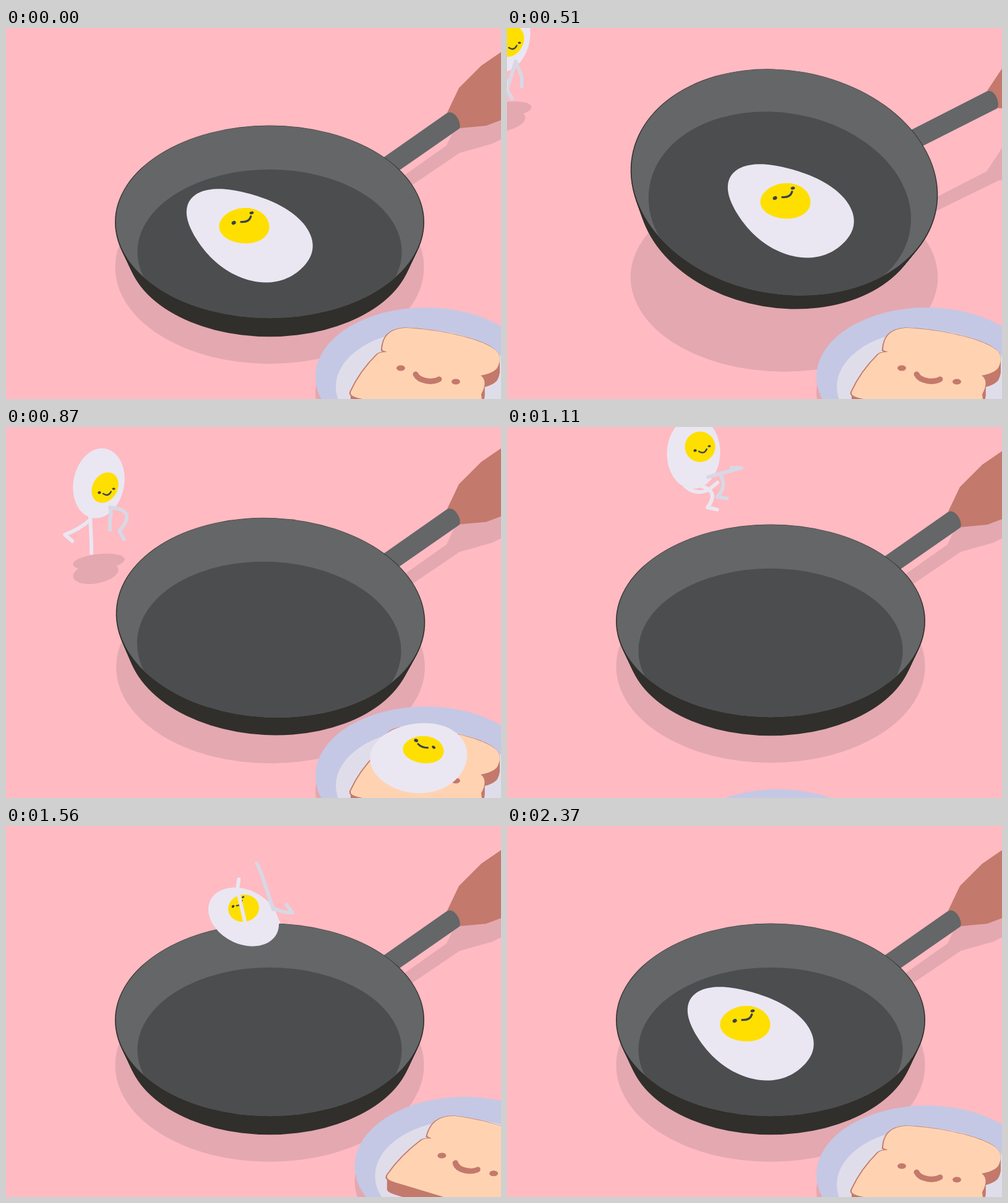
Recreate the animation shown at these times as an HTML page with a canvas. Size 800 by 600 pixels, loop 2.4 s.

```html
<!DOCTYPE html>
<html lang="en">
<head>
<meta charset="utf-8">
<title>Breakfast</title>
<style>
html, body { margin: 0; width: 100%; height: 100%; overflow: hidden; background: #ffbac2; }
canvas { display: block; width: 800px; height: 600px; }
</style>
</head>
<body>
<canvas id="stage" width="800" height="600"></canvas>
<script>
const ctx = document.getElementById('stage').getContext('2d');
const LOOP = 2400, STEP = 30;
const C = {
  bg: '#ffbac2', shade: '#e4a8b0', wall: '#646667', floor: '#4c4d4e', iron: '#302f2b',
  hand: '#c3796b', plate: '#c4c8e4', dish: '#e0ddea', bread: '#ffd3b2',
  white: '#eae7f2', far: '#d8d8e4', yolk: '#ffdf00', ink: '#3a4050'
};

// ---------- helpers ----------
const { PI, sin, cos, sqrt, pow } = Math;
const part = (t, a, b) => Math.max(0, Math.min(1, (t - a) / (b - a)));
const easeOut = (s, p = 2) => 1 - pow(1 - s, p);
const smooth = s => s * s * (3 - 2 * s);
const rad = deg => deg * PI / 180;

// blends numbers, lists and objects alike
function mix(a, b, u) {
  if (typeof a === 'number') return a + (b - a) * u;
  if (Array.isArray(a)) return a.map((v, i) => mix(v, b[i], u));
  return Object.fromEntries(Object.keys(a).map(k => [k, mix(a[k], b[k], u)]));
}

function at(x, y, draw, deg = 0) {
  ctx.save();
  ctx.translate(x, y);
  ctx.rotate(rad(deg));
  draw();
  ctx.restore();
}

function fill(path, color) {
  ctx.fillStyle = color;
  ctx.fill(path);
}

function stroke(path, width, color) {
  ctx.lineWidth = width;
  ctx.lineCap = ctx.lineJoin = 'round';
  ctx.strokeStyle = color;
  ctx.stroke(path);
}

function ellipse(x, y, rx, ry, color, deg = 0) {
  const path = new Path2D();
  path.ellipse(x, y, rx, ry, rad(deg), 0, 2 * PI);
  fill(path, color);
}

// an ellipse with three soft bulges
function oval([x, y, rx, ry, deg, bulge], color) {
  const path = new Path2D();
  for (let a = 0; a < 2 * PI; a += PI / 60) {
    const r = 1 + bulge * cos(3 * a - 0.75 * PI);
    path.lineTo(rx * r * cos(a), ry * r * sin(a));
  }
  at(x, y, () => fill(path, color), deg);
}

// a bent line that ends in a straight tip
function curve(ax, ay, bx, by, cx, cy, tipX = cx, tipY = cy) {
  const path = new Path2D();
  path.moveTo(ax, ay);
  path.quadraticCurveTo(bx, by, cx, cy);
  path.lineTo(tipX, tipY);
  return path;
}

// ---------- pan ----------
// centre, height of the rim's half axis and tilt; handle: x, y, turn
const RIM = 249.5;
const REST = { x: 426, y: 314, ry: 156, tilt: 0, handle: [0, 0, 0] };
const TOSS = { x: 448, y: 250, ry: 181, tilt: 9.75, handle: [63, -35, 8] };
const BACK = { x: 427.5, y: 309, ry: 161.5, tilt: 2.8, handle: [0, -4.5, 0] };
const HANDLE = new Path2D('M585 227L712 138Q720 133 728 143Q736 154 733 162.500L610 248Z');
const HAND = new Path2D('M713 137L732 97L768 61L800 39L900 -20V140L800 149L776 158L733 162Z');
const ARM_SHADE = new Path2D('M712 190L731 150L768 115L900 40V130L800 180L786 187L733 202L640 265L620 255Z');

function panAt(t) {
  if (t < 510) return mix(REST, TOSS, smooth(part(t, 345, 510)));
  if (t < 870) return mix(TOSS, BACK, easeOut(part(t, 510, 870)));
  return mix(BACK, REST, easeOut(part(t, 870, 990)));
}

function turned(px, py, dx, dy, deg, draw) {
  at(px + dx, py + dy, () => {
    ctx.translate(-px, -py);
    draw();
  }, deg);
}

function drawPan({ x, y, ry, tilt, handle: [hx, hy, turn] }) {
  const lift = REST.y - y;
  ellipse(x, 387 + lift / 4, RIM - lift / 50, REST.ry - lift / 20, C.shade);
  turned(712, 190, hx, turn * 5.25, turn, () => fill(ARM_SHADE, C.shade));
  turned(714, 137, hx, hy, turn, () => {
    fill(HAND, C.hand);
    fill(HANDLE, C.wall);
  });
  const depth = sqrt(1 - (ry / RIM) ** 2);
  at(x, y, () => {
    for (let u = 0; u <= 1.001; u += 0.05)
      ellipse(0, 55 * depth * u, (RIM + 0.5) * (1 - 0.078 * u), (ry + 0.4) * (1 - 0.09 * u), C.iron);
    const rim = new Path2D();
    rim.ellipse(0, -0.4, RIM - 1, ry - 0.4, 0, 0, 2 * PI);
    fill(rim, C.wall);
    ctx.clip(rim);
    ellipse(0, 61.5 * depth, RIM * 0.856, ry * 0.854, C.floor);
  }, tilt);
}

// ---------- toast on its plate ----------
const TOAST = new Path2D('M608 521C609 500 618 487 645 485C700 487 770 503 790 520' +
  'C800 527 800 540 793 551C787 557 778 560 767 562C776 568 775 580 768 592L772 628' +
  'Q770 640 755 637L572 599Q553 595 558 587Q572 556 600 528Q604 524 616 524Z');
const MOUTH = new Path2D('M662 560C668 572 690 574 700 568');

// turn within the plane of the table
function spin(deg, draw) {
  ctx.save();
  ctx.translate(678, 563);
  ctx.scale(1, 0.62);
  ctx.rotate(rad(deg));
  ctx.scale(1, 1 / 0.62);
  ctx.translate(-678, -563);
  draw();
  ctx.restore();
}

function drawPlate(dx, dy, egg) {
  const deg = dx * 0.116;
  at(dx, dy, () => {
    ellipse(678, 589, 178, 112, C.shade);
    ellipse(678, 564, 178, 112, C.plate);
    ellipse(678, 580, 145, 91, C.dish);
    for (let d = 20; d >= 0; d -= 2)
      at(0, d, () => spin(deg, () => fill(TOAST, C.hand)));
    spin(deg, () => {
      at(-1, 0.4, () => stroke(TOAST, 2.4, C.hand));
      fill(TOAST, C.bread);
      ellipse(638, 550, 7, 4.5, C.hand);
      ellipse(727, 572, 7, 4.5, C.hand);
      stroke(MOUTH, 9, C.hand);
      if (egg) drawEgg(egg);
    });
  });
}

// ---------- eggs ----------
// body and yolk: x, y, rx, ry, turn, bulge
// face: x, y, half the distance of the eyes, turn, shift and depth of the smile
const BIG = {
  body: [393.5, 334.5, 66, 107, -65, 0.05],
  yolk: [385.5, 320, 40.5, 28.7, 0, 0.02],
  face: [382.5, 307, 16.5, -29, 0.22, 0.7]
};
const SMALL = {
  body: [387, 320.5, 50, 76.5, -63, 0.03],
  yolk: [386, 312, 38, 26.5, 0, 0.02],
  face: [382.5, 299.5, 15.5, -29, 0.22, 0.7]
};
const SERVED = {
  body: [668, 535, 56.5, 78.5, -94, 0.02],
  yolk: [675, 522, 33, 22, 5, 0.02],
  face: [677, 512.5, 15.2, 21, -0.12, 0.5]
};
const STAND = {
  body: [150, 91, 41, 57, 11, 0],
  yolk: [160, 98, 20, 26, 30, 0],
  face: [162.5, 103, 12, -15, 0, 0.9]
};
const LEAP = {
  body: [301.5, 42, 43, 58, 2, 0],
  yolk: [312, 32, 24.5, 24.5, 0, 0],
  face: [315.5, 34.5, 12, -17, 0, 0.9]
};
const DIVE = {
  body: [384, 147, 43.6, 60, -63, 0],
  yolk: [384, 133, 25, 22, -10, 0],
  face: [375, 122.5, 11, -43, 0, 0.8]
};

function drawFace([x, y, half, deg, shift, depth]) {
  at(x, y, () => {
    const u = v => v * half;
    ellipse(-half, 0, u(0.22), u(0.18), C.ink);
    ellipse(half, 0, u(0.21), u(0.14), C.ink, 15);
    stroke(curve(u(shift - 0.55), u(0.27), u(shift * 1.5), u(depth), u(shift + 0.55), u(0.27)), u(0.2), C.ink);
  }, deg);
}

function drawEgg({ body, yolk, face }) {
  oval(body, C.white);
  oval(yolk, C.yolk);
  drawFace(face);
}

// limbs, near pair first: hip, foot, bend of the knee, direction of the toe
const STAND_LIMBS = [[136, 145, 138, 188, 0, 90], [136, 150, 95, 174, 0.1, 41],
  [168, 130, 168, 150, 0.15, 90], [168, 130, 183, 168, 1, 60]];
const LEAP_LIMBS = [[288, 96, 328, 100, -0.35, -40], [312, 95, 324, 130, 0.75, 13],
  [325, 81, 379, 66, 0, 180], [346, 79, 340, 113, 0.35, 10]];
const DIVE_LIMBS = [[386, 154, 374, 102, 0, -82], [436, 150, 432, 142, 0, 60],
  [432, 135, 412, 75, 0, 245], [431, 132, 463, 140, -0.15, -127]];
const SWING = [[14, -28], [30, 16], [10, 5], [-29, 8]];

const stride = w => STAND_LIMBS.map(([hx, hy, fx, fy, bend, toe], i) =>
  [hx, hy, fx + SWING[i][0] * w, fy + SWING[i][1] * w, bend * (1 - w), toe]);

function drawLimb([hx, hy, fx, fy, bend, toe], color, size = 1) {
  const kneeX = (hx + fx) / 2 + bend * (fy - hy);
  const kneeY = (hy + fy) / 2 - bend * (fx - hx);
  const tipX = fx + 16 * size * cos(rad(toe)), tipY = fy + 16 * size * sin(rad(toe));
  stroke(curve(hx, hy, kneeX, kneeY, fx, fy, tipX, tipY), 6 * size, color);
}

function drawWalker(egg, limbs, size) {
  drawEgg(egg);
  limbs.slice(2).forEach(l => drawLimb(l, C.far, size));
  limbs.slice(0, 2).forEach(l => drawLimb(l, C.white, size));
}

const FALL = 170;
const moved = (list, dy) => list.map((v, i) => i === 1 ? v + dy : v);
const LANDED = Object.fromEntries(Object.entries(DIVE).map(([k, v]) => [k, moved(v, FALL)]));

function newEgg(t) {
  if (t < 420) return;
  if (t <= 870) {
    const left = (870 - t) / 360;
    const w = 0.5 - 0.5 * cos(2 * PI * (870 - t) / 240);
    at(-152 * left - 2 * w, -86 * left + 10 * w, () => drawWalker(STAND, stride(w)));
  } else if (t <= 1110) {
    const s = part(t, 870, 1110);
    at(0, -22 * sin(PI * s), () => drawWalker(mix(STAND, LEAP, s), mix(STAND_LIMBS, LEAP_LIMBS, s)));
  } else if (t <= 1560) {
    const s = part(t, 1110, 1560), u = easeOut(s, 1.5);
    at(0, -16 * sin(PI * s), () => drawWalker(mix(LEAP, DIVE, u), mix(LEAP_LIMBS, DIVE_LIMBS, u)));
  } else if (t < 1680) {
    // the limbs draw in during the fall
    const s = part(t, 1560, 1680), [x, y] = DIVE.body;
    const limbs = DIVE_LIMBS.map(l => mix(l, [x, y, x, y, 0, l[5]], s));
    at(0, FALL * s * s, () => drawWalker(DIVE, limbs, 1 - s));
  } else if (t < 2010) {
    drawEgg(mix(LANDED, SMALL, part(t, 1680, 2010)));
  } else {
    drawEgg(mix(SMALL, BIG, easeOut(part(t, 2010, 2370), 1.6)));
  }
}

function walkerShadow(t) {
  if (t < 420 || t > 1110) return;
  const left = (870 - t) / 360;
  const x = left > 0 ? -152 * left : -228 * left;
  const y = left > 0 ? -86 * left : -120 * left;
  ellipse(150 + x, 218 + y, 42, 12.5, C.shade, -6);
  ellipse(145 + x, 236 + y, 37, 17, C.shade, -10);
}

// the cooked egg, until it lies on the toast
function cookedEgg(t) {
  const u = smooth(part(t, 345, 510)), s = part(t, 510, 810);
  if (s < 1) {
    const left = u * (1 - s);
    at(65 * left, -40 * left - 1040 * s * (1 - s), () => drawEgg(mix(BIG, SERVED, s)));
  }
}

function plate(t) {
  if (t < 1260) {
    const s = pow(Math.max(0, t - 870) / 240, 1.5);
    drawPlate(-240 * s, 134 * s, t >= 810 && SERVED);
  } else {
    const dx = 330 * pow(1 - part(t, 1380, 1680), 1.8);
    drawPlate(dx, -0.22 * dx);
  }
}

function draw(t) {
  ctx.fillStyle = C.bg;
  ctx.fillRect(0, 0, 800, 600);
  walkerShadow(t);
  drawPan(panAt(t));
  plate(t);
  if (t < 810) cookedEgg(t);
  newEgg(t);
}

const start = performance.now();
function tick() {
  const t = (performance.now() - start) % LOOP;
  draw(Math.floor(t / STEP) * STEP);
  requestAnimationFrame(tick);
}
tick();
</script>
</body>
</html>
```
